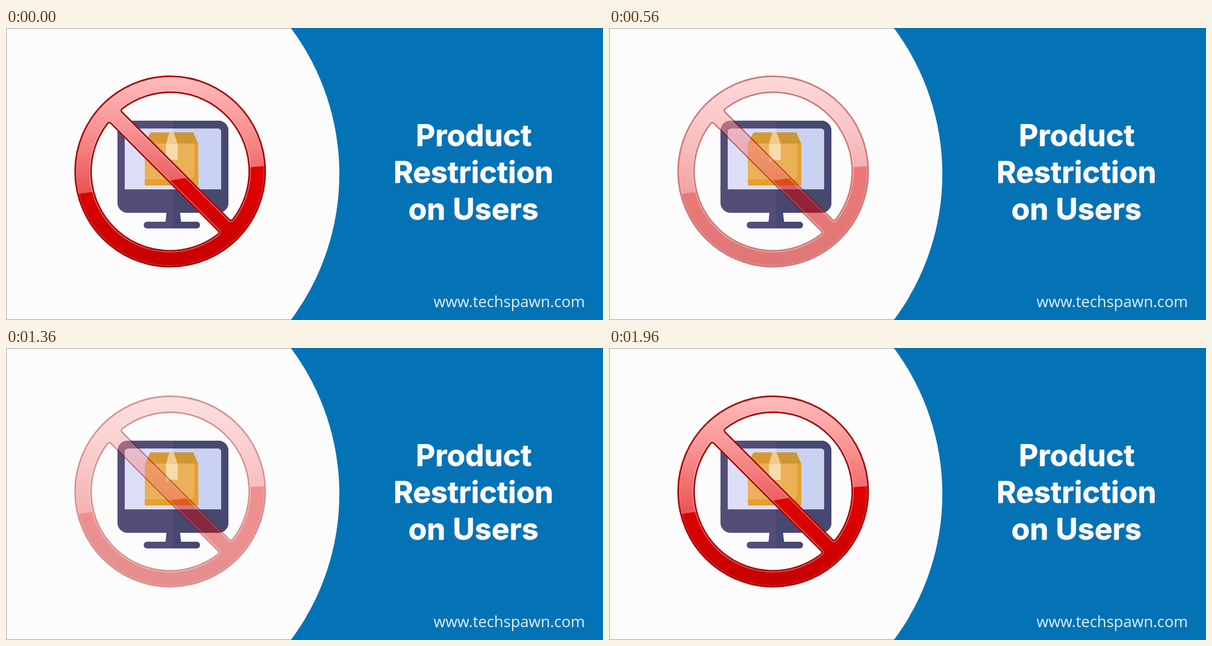
Recreate the animation shown at these times as an HTML page. Size 1071 px wide and 523 px high, loop 2 s.

```html
<!DOCTYPE html>
<html lang="en">
<head>
<meta charset="utf-8">
<title>Product Restriction on Users</title>
<style>
  html, body { margin: 0; width: 100%; height: 100%; overflow: hidden; background: #fcfcfc; }
  svg { display: block; }
  .title { font: 700 54px Inter, sans-serif; text-anchor: middle; }
  .url { font: 400 27.5px "Open Sans", sans-serif; fill: #e4eff8; }
</style>
</head>
<body>
<svg width="1071" height="523" viewBox="0 0 1071 523">
  <defs>
    <linearGradient id="gloss" gradientUnits="userSpaceOnUse" x1="0" y1="85" x2="0" y2="297">
      <stop offset="0" stop-color="#ffbcbc"/>
      <stop offset=".45" stop-color="#f99393"/>
      <stop offset="1" stop-color="#ea5252"/>
    </linearGradient>
    <linearGradient id="red" gradientUnits="userSpaceOnUse" x1="0" y1="247" x2="0" y2="430">
      <stop offset="0" stop-color="#e20303"/>
      <stop offset="1" stop-color="#c60000"/>
    </linearGradient>
    <path id="openings" d="M-136-14H136Q140.8-14 140.3-19A141.5 141.5 0 0 0-140.3-19Q-140.8-14-136-14Z
      M136 14H-136Q-140.8 14-140.3 19A141.5 141.5 0 0 0 140.3 19Q140.8 14 136 14Z"/>
    <clipPath id="band">
      <path transform="translate(294.5 257) rotate(45)" clip-rule="evenodd"
        d="M-171 0A171 171 0 0 1 171 0A171 171 0 0 1-171 0Z
        M-136-14H136Q140.8-14 140.3-19A141.5 141.5 0 0 0-140.3-19Q-140.8-14-136-14Z
        M136 14H-136Q-140.8 14-140.3 19A141.5 141.5 0 0 0 140.3 19Q140.8 14 136 14Z"/>
    </clipPath>
    <clipPath id="rightHalf"><path d="M299.5 160H410V365H299.5Z"/></clipPath>
    <g id="case">
      <rect x="200" y="166" width="199" height="165" rx="18"/>
      <path d="M288 330H312L314 348H286Z"/>
      <rect x="247" y="347" width="101" height="12" rx="6"/>
    </g>
    <path id="screen" d="M213 289V187Q213 180 220 180H379Q386 180 386 187V289Z"/>
    <g id="title" class="title">
      <text x="839.5" y="211">Product</text>
      <text x="839" y="277">Restriction</text>
      <text x="839" y="343">on Users</text>
    </g>
  </defs>

  <rect width="1071" height="523" fill="#fcfcfc"/>
  <rect x=".5" y=".5" width="1070" height="522" fill="none" stroke="#000" stroke-opacity=".38"/>
  <path d="M511 0A436.5 436.5 0 0 1 511 523H1071V0Z" fill="#0473b5"/>

  <g id="monitor">
    <use href="#case" fill="#524e78"/>
    <use href="#case" fill="#474870" clip-path="url(#rightHalf)"/>
    <use href="#screen" fill="#dddef8"/>
    <use href="#screen" fill="#c9d1f0" clip-path="url(#rightHalf)"/>
  </g>

  <g id="parcel">
    <path d="M259 187H336L345 208H249Z" fill="#d89b33"/>
    <path d="M299.5 187H336L345 208H299.5Z" fill="#cd9735"/>
    <path d="M249 207H345V282H249Z" fill="#e4a02f"/>
    <path d="M249 207H338V261Q338 271 328 271H249Z" fill="#ebb157"/>
    <path d="M293 187H301L308 208H287Z" fill="#eecb90"/>
    <path d="M287 208H308V236H294L287 241Z" fill="#f7dcab"/>
  </g>

  <g id="sign">
    <g clip-path="url(#band)">
      <rect x="120" y="83" width="350" height="350" fill="url(#red)"/>
      <path d="M120 83H470V246.5Q440 248 420 252Q290 275 120 298Z" fill="url(#gloss)"/>
      <path d="M470 246.5Q440 248 420 252Q290 275 120 298" fill="none" stroke="#fff" stroke-opacity=".2"/>
      <g fill="none" stroke="#fff" stroke-opacity=".45" transform="translate(294.5 257) rotate(45)">
        <circle r="168.5" stroke-opacity=".25"/>
        <use href="#openings" stroke-width="5.5"/>
      </g>
    </g>
    <g fill="none" stroke="#a90b0b" stroke-width="3" transform="translate(294.5 257) rotate(45)">
      <circle r="170.5"/>
      <use href="#openings"/>
    </g>
  </g>

  <use href="#title" x="-1" y="1" fill="#dcd6e8"/>
  <use href="#title" fill="#fbfaff"/>
  <text class="url" x="767" y="500">www.techspawn.com</text>
</svg>
<script>
  const LOOP = 2000, STEP = 40;
  const sign = document.getElementById('sign');

  function draw(now) {
    const t = Math.floor((now % LOOP) / STEP) * STEP;
    // Smooth fade between 100% and 20%.
    sign.style.opacity = 0.6 + 0.4 * Math.cos(2 * Math.PI * t / LOOP);
  }

  const start = performance.now();
  function tick() {
    draw(performance.now() - start);
    requestAnimationFrame(tick);
  }
  tick();
</script>
</body>
</html>
```
